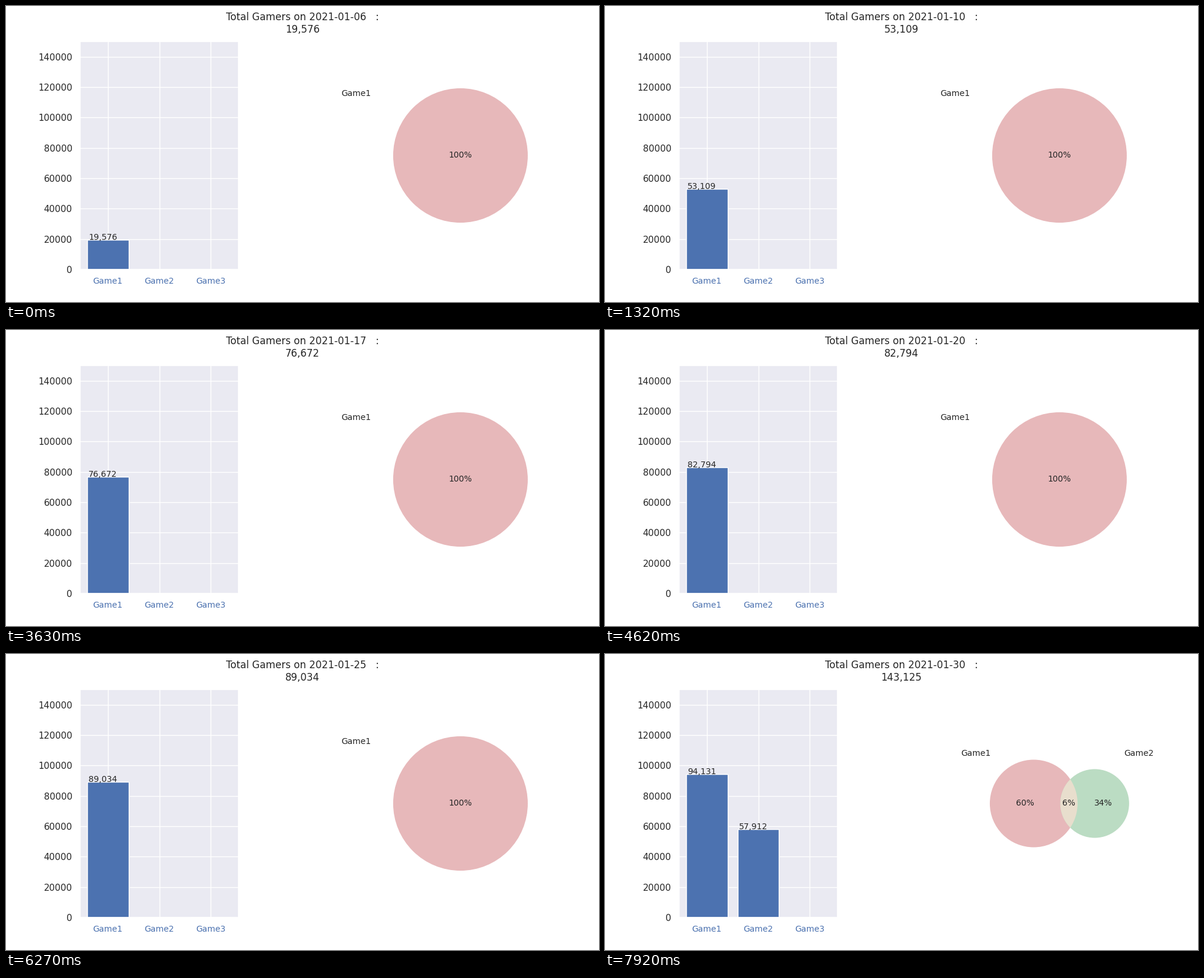
Write a matplotlib script that moves like this. It is 1000 px wide and 500 px high and loops after 8000 ms.

```python
import math

import matplotlib.pyplot as plt
import numpy as np
from matplotlib.animation import FuncAnimation
from matplotlib.patches import Circle, Polygon

LOOP, INTERVAL, HOLD = 8000, 40, 330
FIRST_DAY = 6

# Daily player counts; the second game starts on the 29th.
GAME1 = [19576, 31248, 40917, 47635, 53109, 57284, 60793, 63951, 67002,
         70346, 73618, 76672, 79013, 81057, 82794, 84283, 85627, 86859,
         87986, 89034, 90027, 90991, 91955, 93018, 94131]
GAME2 = {29: 20034, 30: 57912}
BOTH = {29: 4100, 30: 8918}

INK, BLUE, PANEL = "#262626", "#4c72b0", "#eaeaf2"
RED = np.array([196, 78, 82]) / 255
GREEN = np.array([85, 168, 104]) / 255

plt.rcParams.update({
    "font.family": "DejaVu Sans", "font.size": 10,
    "text.color": INK, "axes.labelcolor": INK,
})


def tint(color):
    """Colour at 40% opacity over white."""
    return 1 - 0.4 * (1 - color)


def half_angles(ra, rb, d):
    """Half the angle of each circle's arc that bounds the lens."""
    cos_a = (d * d + ra * ra - rb * rb) / (2 * d * ra)
    cos_b = (d * d + rb * rb - ra * ra) / (2 * d * rb)
    return [math.acos(max(-1.0, min(1.0, c))) for c in (cos_a, cos_b)]


def lens_area(ra, rb, d):
    return sum(r * r * (t - math.sin(2 * t) / 2)
               for r, t in zip((ra, rb), half_angles(ra, rb, d)))


def distance_for(ra, rb, area):
    low, high = abs(ra - rb) + 1e-9, ra + rb
    for _ in range(50):
        mid = (low + high) / 2
        if lens_area(ra, rb, mid) > area:
            low = mid
        else:
            high = mid
    return (low + high) / 2


def lens_points(xa, ra, xb, rb):
    ta, tb = half_angles(ra, rb, xb - xa)
    a = np.linspace(-ta, ta, 60)
    b = np.linspace(math.pi - tb, math.pi + tb, 60)
    return np.column_stack([
        np.r_[xa + ra * np.cos(a), xb + rb * np.cos(b)],
        np.r_[ra * np.sin(a), rb * np.sin(b)],
    ])


fig, (bar_ax, venn_ax) = plt.subplots(
    1, 2, figsize=(10, 5), dpi=100, facecolor="white",
    gridspec_kw={"left": 0.125, "right": 0.9, "bottom": 0.11, "top": 0.88,
                 "wspace": 0.9})
title = fig.suptitle("", fontsize=12, y=0.98)

# Bar chart
bar_ax.set_facecolor(PANEL)
bar_ax.set_axisbelow(True)
bar_ax.grid(True, color="white", linewidth=1, linestyle="-")
for spine in bar_ax.spines.values():
    spine.set(edgecolor="white", linewidth=1.25)
bars = bar_ax.bar(range(3), [0, 0, 0], width=0.8, color=BLUE,
                  edgecolor="white", linewidth=1)
bar_ax.set_xlim(-0.54, 2.54)
bar_ax.set_ylim(0, 150000)
bar_ax.set_xticks(range(3), ["Game1", "Game2", "Game3"])
bar_ax.set_yticks(range(0, 140001, 20000))
bar_ax.tick_params(length=0, pad=9.5)
bar_ax.tick_params(axis="x", labelsize=10, labelcolor=BLUE)
bar_ax.tick_params(axis="y", labelsize=11, labelcolor=INK)
counts = [bar_ax.text(i - 0.375, 0, "") for i in range(3)]

# Venn diagram
venn_ax.set_axis_off()
venn_ax.set_aspect("equal")
disc_a = venn_ax.add_patch(Circle((0, 0), 1, fc=tint(RED), lw=0))
disc_b = venn_ax.add_patch(Circle((0, 0), 1, fc=tint(GREEN), lw=0))
lens = venn_ax.add_patch(
    Polygon([(0, 0)] * 3, fc=tint(0.7 * (RED + GREEN)), lw=0))
venn_ax.text(-1, 0.5, "Game1")
name_b = venn_ax.text(0.7, 0.5, "Game2")
shares = [venn_ax.text(0, 0, "", ha="center", va="center") for _ in range(3)]


def draw_venn(a, b, both):
    total = a + b - both
    ra, rb = (math.sqrt(n / total / math.pi) for n in (a, b))
    for artist in (disc_b, lens, name_b, *shares[1:]):
        artist.set_visible(b > 0)
    if b:
        d = distance_for(ra, rb, both / total)
        xa = -d * rb**2 / (ra**2 + rb**2)
        xb = xa + d
        right, top = xb + rb, max(ra, rb)
        disc_b.set(center=(xb, 0), radius=rb)
        lens.set_xy(lens_points(xa, ra, xb, rb))
        edges = [xa - ra, xb - rb, xa + ra, xb + rb]
    else:
        xa, right, top = 0, ra, ra
        edges = [-ra, ra]
    disc_a.set(center=(xa, 0), radius=ra)
    parts = [a - both, both, b - both]
    for label, part, x0, x1 in zip(shares, parts, edges, edges[1:]):
        label.set_position(((x0 + x1) / 2, 0))
        label.set_text(f"{part / total:.0%}")
    venn_ax.set_xlim(xa - ra - 0.1, right + 0.1)
    venn_ax.set_ylim(-top - 0.1, top + 0.1)


def update(frame):
    step = min((frame * INTERVAL + INTERVAL - 1) // HOLD, len(GAME1) - 1)
    day = FIRST_DAY + step
    a, b, both = GAME1[step], GAME2.get(day, 0), BOTH.get(day, 0)
    title.set_text(
        f"Total Gamers on 2021-01-{day:02d}   :\n{a + b - both:,}")
    for bar, label, n in zip(bars, counts, (a, b, 0)):
        bar.set_height(n)
        label.set_y(n)
        label.set_text(f"{n:,}" if n else "")
    draw_venn(a, b, both)
    return []


anim = FuncAnimation(fig, update, frames=LOOP // INTERVAL, interval=INTERVAL,
                     repeat=True, repeat_delay=0, blit=False)
plt.show()
```
